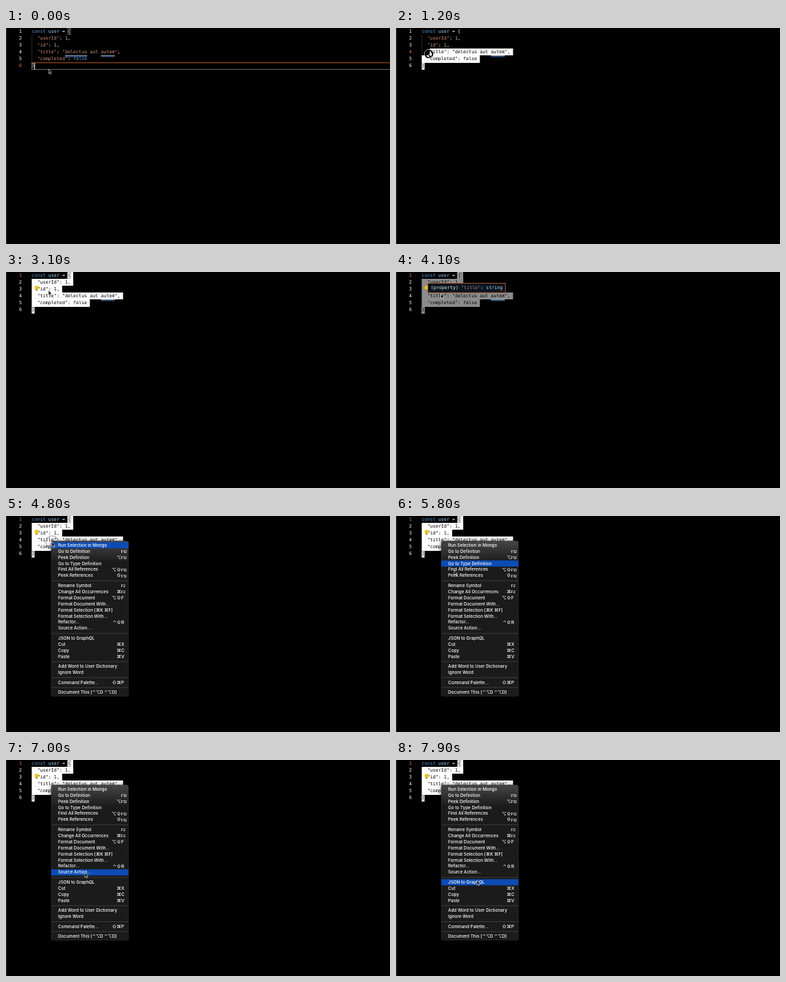
Recreate the animation shown at these times as an HTML page with a canvas. Size 560 by 316 pixels, loop 8000 ms.

```html
<!DOCTYPE html>
<html lang="en">
<head>
<meta charset="utf-8">
<title>Editor selection</title>
<style>
html, body { margin: 0; height: 100%; overflow: hidden; background: #000; }
canvas { display: block; }
</style>
</head>
<body>
<canvas width="560" height="316"></canvas>
<script>
const ctx = document.querySelector('canvas').getContext('2d');
const LOOP = 8000, STEP = 100;
const LEFT = 37.6, CHAR = 4.033, ROW = 10.1;
const MONO = '6.7px "DejaVu Sans Mono", monospace';
const SANS = 'Inter, "DejaVu Sans", sans-serif';

const BLUE = '#569cd6', SKY = '#9cdcfe', TAN = '#ce9178', GREEN = '#b5cea8', WHITE = '#fff', ORANGE = '#e0782c';

// Each code line is a list of [text, colour] pieces.
const code = [
  [['const ', BLUE], ['user', SKY], [' = {', WHITE]],
  [['  "userId"', TAN], [': ', WHITE], ['1', GREEN], [',', WHITE]],
  [['  "id"', TAN], [': ', WHITE], ['1', GREEN], [',', WHITE]],
  [['  "title"', TAN], [': ', WHITE], ['"delectus aut autem"', TAN], [',', WHITE]],
  [['  "completed"', TAN], [': ', WHITE], ['false', BLUE]],
  [['}', WHITE]]
];
const lengths = code.map(line => line.reduce((n, [s]) => n + s.length, 0));
const rowTop = i => Math.round(i * ROW);

const menu = `Run Selection in Mongo
Go to Definition||F12
Peek Definition|⌥|F12
Go to Type Definition
Find All References|⌥⇧|F12
Peek References|⇧|F12
-
Rename Symbol||F2
Change All Occurrences|⌘|F2
Format Document|⌥⇧|F
Format Document With...
Format Selection [⌘K ⌘F]
Format Selection With...
Refactor...|⌃⇧|R
Source Action...
-
JSON to GraphQL
Cut|⌘|X
Copy|⌘|C
Paste|⌘|V
-
Add Word to User Dictionary
Ignore Word
-
Command Palette...|⇧⌘|P
-
Document This [⌃⌥D ⌃⌥D]`.split('\n').map(s => s.split('|'));
let nextY = 42.8;
const items = [];
for (const [label, mods = '', key = ''] of menu) {
  if (label === '-') {
    items.push({ y: nextY - 1.7, rule: true });
    nextY += 5.5;
  } else {
    items.push({ y: nextY, label, mods, key });
    nextY += 8.94;
  }
}

// Pointer tip: time, x, y
const path = [
  [0, 62, 60], [100, 62, 60], [200, 61, 61], [300, 61, 61], [700, 42, 56], [800, 42, 56],
  [1200, 48, 38], [2100, 90, 8], [2300, 90, 8], [3100, 62, 27], [3500, 62, 27],
  [4000, 65, 30], [4400, 67, 38], [5400, 67, 38], [6300, 107, 131],
  [6600, 112, 154], [6700, 112, 154], [7300, 118, 176], [LOOP, 118, 176]
];
const PRESS = 800, RELEASE = 2200, HOVER = 3600, UNHOVER = 4400, RIGHT = 4500, MENU = 4600;

const clamp = v => Math.max(0, Math.min(1, v));

function pointer(t) {
  const i = Math.max(1, path.findIndex(p => p[0] >= t));
  const [t0, x0, y0] = path[i - 1], [t1, x1, y1] = path[i];
  const k = clamp((t - t0) / (t1 - t0));
  return [x0 + (x1 - x0) * k, y0 + (y1 - y0) * k];
}

function rect(x, y, w, h, color) {
  ctx.fillStyle = color;
  ctx.fillRect(x, y, w, h);
}

function text(s, x, y, color, font, align = 'left') {
  ctx.font = font;
  ctx.textAlign = align;
  ctx.textBaseline = 'middle';
  ctx.fillStyle = color;
  ctx.fillText(s, x, y);
}

function pieces(list, x, y, color) {
  for (const [s, own] of list) {
    text(s, x, y, color || own, MONO);
    x += s.length * CHAR;
  }
}

function underline(col, n) {
  const x = LEFT + col * CHAR;
  rect(x, 39.9, n * CHAR, 1, '#93abd0');
  rect(x, 41.5, n * CHAR, 0.9, '#4f79bd');
}

function bracketBox(row, col) {
  ctx.strokeStyle = '#888';
  ctx.lineWidth = 0.7;
  ctx.strokeRect(LEFT + col * CHAR, rowTop(row) + 0.6, CHAR, ROW - 1);
}

// Where the caret is: the drag runs from the end of the last line upwards.
function caretAt(t) {
  if (t < PRESS) return [5, 1];
  const [x, y] = pointer(Math.min(t, 2100));
  const row = Math.max(0, Math.min(5, Math.floor(y / ROW)));
  const col = Math.round((x - LEFT) / CHAR);
  return [row, Math.max(0, Math.min(lengths[row], col))];
}

function drawSelection(row, col, color) {
  for (let i = row; i < 6; i++) {
    const from = i === row ? col : 0;
    const to = i === 5 ? 1 : lengths[i] + 1;
    if (to <= from) continue;
    const box = [LEFT + from * CHAR, rowTop(i), (to - from) * CHAR, rowTop(i + 1) - rowTop(i)];
    ctx.save();
    ctx.beginPath();
    ctx.rect(...box);
    ctx.clip();
    rect(0, box[1], 560, box[3], color);
    pieces(code[i], LEFT, i * ROW + 5, '#000');
    ctx.restore();
  }
}

function drawEditor(t) {
  const [row, col] = caretAt(t);
  const empty = row === 5;
  rect(0, 0, 560, 316, '#000');
  rect(0, 0, 1, 316, '#2c3434');
  rect(LEFT, ROW, 0.6, ROW * 4, '#444');
  if (empty) {
    rect(LEFT, 50.3, 560, 1, '#b8581c');
    rect(LEFT, 60, 560, 0.9, '#77736c');
  }
  code.forEach((line, i) => {
    text(i + 1, 23, i * ROW + 5, i === row ? ORANGE : WHITE, MONO, 'right');
    pieces(line, LEFT, i * ROW + 5);
  });
  underline(12, 8);
  underline(25, 5);
  if (!empty) {
    const dim = clamp((t - HOVER + STEP) / 300) * clamp((UNHOVER - t) / 200);
    const g = Math.round(255 - 115 * dim);
    drawSelection(row, col, `rgb(${g},${g},${g})`);
  }
  if (empty || t >= RELEASE) {
    bracketBox(0, 13);
    bracketBox(5, 0);
  }
  if ((t + 200) % 1000 < 500) rect(LEFT + col * CHAR - 0.3, rowTop(row) + 0.3, 0.9, ROW - 0.6, WHITE);
}

function drawBulb() {
  ctx.fillStyle = '#f5c518';
  ctx.beginPath();
  ctx.arc(44.6, 23, 2.9, 0, 7);
  ctx.fill();
  rect(43.4, 25.6, 2.4, 1.8, '#8a7420');
}

function drawHover(t) {
  ctx.globalAlpha = clamp((t - HOVER + STEP) / 200);
  rect(46, 16, 114, 14.5, '#0c141f');
  ctx.strokeStyle = '#b0602c';
  ctx.lineWidth = 0.9;
  ctx.strokeRect(46.4, 16.4, 113.2, 13.8);
  pieces([['(property) ', '#e4eef8'], ['"title"', '#a98672'], [': ', WHITE], ['string', SKY]], 50.7, 23.4);
  ctx.globalAlpha = 1;
}

function drawMenu(t) {
  // The panel is slightly see-through, so it is paler over the selection.
  const panel = ctx.createLinearGradient(0, 36, 0, 68);
  panel.addColorStop(0, '#464646');
  panel.addColorStop(1, '#1b1b1b');
  ctx.save();
  ctx.shadowColor = 'rgba(0,0,0,.6)';
  ctx.shadowBlur = 6;
  ctx.shadowOffsetY = 1;
  ctx.fillStyle = panel;
  ctx.beginPath();
  ctx.roundRect(66, 36.6, 112.5, 227, 2.5);
  ctx.fill();
  ctx.restore();
  ctx.strokeStyle = '#383838';
  ctx.lineWidth = 0.5;
  ctx.stroke();
  const y = pointer(t - STEP)[1];
  for (const item of items) {
    if (item.rule) {
      rect(66.5, item.y - 0.3, 111.5, 0.8, '#444');
      continue;
    }
    if (Math.abs(y - item.y) < 4.9) rect(66, item.y - 4.6, 112.5, 9, '#0c4cb4');
    const small = item.key.length > 1;
    text(item.label, 76, item.y, WHITE, '500 6.32px ' + SANS);
    text(item.mods, 168, item.y, WHITE, '500 6.6px ' + SANS, 'right');
    text(item.key, 168, item.y + (small ? 0.6 : 0), WHITE, (small ? '600 4.9px ' : '500 6.6px ') + SANS);
  }
}

function ring(x, y, r, width, color) {
  ctx.strokeStyle = color;
  ctx.lineWidth = width;
  ctx.beginPath();
  ctx.arc(x, y, r, 0, 7);
  ctx.stroke();
}

function drawPointer(t) {
  const [x, y] = pointer(t);
  if (t >= PRESS && t < RELEASE) {
    ring(x, y, 6.7, 0.9, '#ddd');
    ring(x, y, 5.4, 1.9, '#000');
  }
  if (t >= RIGHT && t < 5000) {
    const k = (t - RIGHT) / 500;
    ring(x, y, 6 + 5 * k, 2, `rgba(110,115,120,${1 - k})`);
  }
  ctx.save();
  ctx.translate(x, y);
  ctx.beginPath();
  for (const [a, b] of [[0, 0], [0, 6.6], [1.5, 5.3], [2.6, 7.7], [3.6, 7.2], [2.6, 5], [4.6, 4.8]]) ctx.lineTo(a, b);
  ctx.closePath();
  ctx.fillStyle = '#000';
  ctx.fill();
  ctx.strokeStyle = '#ddd';
  ctx.lineWidth = 0.7;
  ctx.stroke();
  ctx.restore();
}

function draw(now) {
  const t = Math.floor((now % LOOP) / STEP) * STEP;
  drawEditor(t);
  if (t >= 2700) drawBulb();
  if (t >= HOVER && t < UNHOVER) drawHover(t);
  if (t >= MENU) drawMenu(t);
  drawPointer(t);
}

const start = performance.now();
function tick() {
  draw(performance.now() - start);
  requestAnimationFrame(tick);
}
tick();
</script>
</body>
</html>
```
